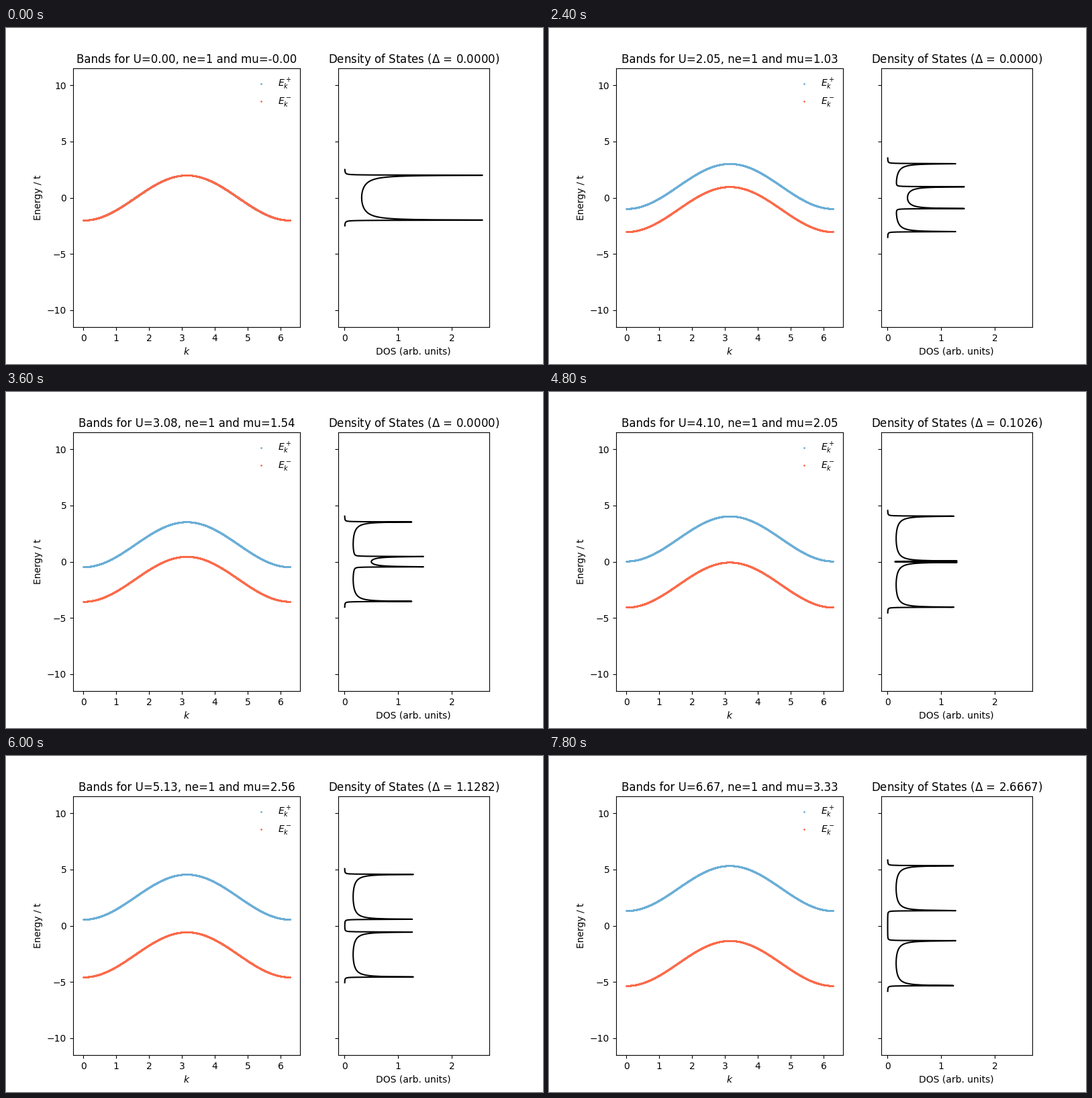
Recreate the animation shown at these times as a matplotlib script. Size 800 by 500 pixels, loop 8000 ms.

```python
import numpy as np
import matplotlib.pyplot as plt
from matplotlib.animation import FuncAnimation

INTERVAL = 100          # ms per tick
TICKS = 80
TICKS_PER_STEP = 3      # the interaction grows every 300 ms
U_STEP = 10 / 39
HOPPING = 1.0
BROADENING = 0.01

k = np.linspace(0, 2 * np.pi, 1000)


def band(shift):
    return -2 * HOPPING * np.cos(k) + shift


def chain_dos(energy):
    """Broadened density of states of a one-dimensional chain."""
    z = energy + 1j * BROADENING
    green = 1 / (np.sqrt(z - 2 * HOPPING) * np.sqrt(z + 2 * HOPPING))
    return -green.imag / np.pi


def total_dos(u):
    edge = 2.5 + u / 2
    energy = np.linspace(-edge, edge, 1000)
    return chain_dos(energy - u / 2) + chain_dos(energy + u / 2), energy


fig, (ax_band, ax_dos) = plt.subplots(
    1, 2, sharey=True, figsize=(8, 5), dpi=100,
    gridspec_kw={"width_ratios": [3, 2]})

upper = ax_band.scatter(k, band(0), s=1, color="#6baed6", label="$E_k^+$")
lower = ax_band.scatter(k, band(0), s=1, color="#fb6a4a", label="$E_k^-$")
dos_line, = ax_dos.plot(*total_dos(0), color="black")

ax_band.set_xlim(-0.1 * np.pi, 2.1 * np.pi)
ax_band.set_ylim(-11.5, 11.5)
ax_band.set_xlabel("$k$")
ax_band.set_ylabel("Energy / t")
ax_band.legend(loc="upper right", frameon=False)
ax_dos.set_xlim(ax_dos.get_xlim())
ax_dos.set_xlabel("DOS (arb. units)")


def update(tick):
    u = tick // TICKS_PER_STEP * U_STEP
    mu = u / 2 if u else -0.0
    gap = max(u - 4 * HOPPING, 0)
    upper.set_offsets(np.column_stack([k, band(u / 2)]))
    lower.set_offsets(np.column_stack([k, band(-u / 2)]))
    dos_line.set_data(*total_dos(u))
    ax_band.set_title(f"Bands for U={u:.2f}, ne=1 and mu={mu:.2f}")
    ax_dos.set_title(rf"Density of States ($\Delta$ = {gap:.4f})")
    return upper, lower, dos_line


anim = FuncAnimation(fig, update, frames=TICKS, interval=INTERVAL,
                     repeat=True, repeat_delay=0, blit=False)
plt.show()
```
